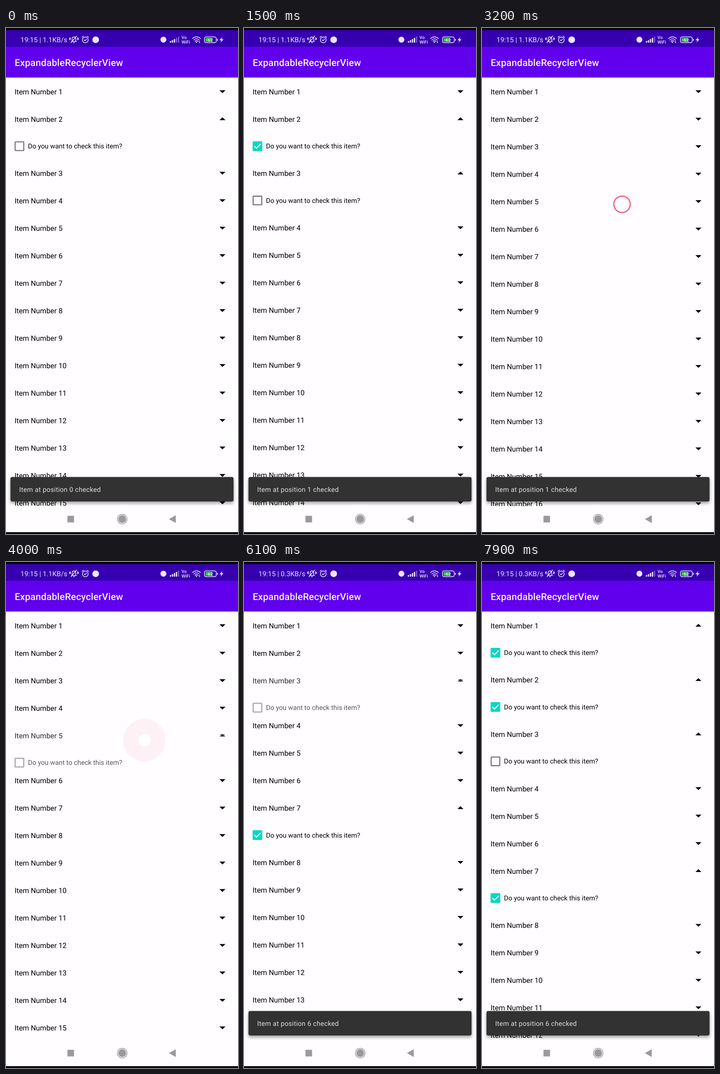
An HTML page for the animation above (8 s loop, 507 by 1105 pixels).

```html
<!DOCTYPE html>
<html lang="en">
<head>
<meta charset="utf-8">
<title>Expandable list</title>
<style>
  html, body { margin: 0; width: 100%; height: 100%; overflow: hidden; background: #fffdff; }
  svg { display: block; }
  text { font-family: Roboto, "Noto Sans", sans-serif; white-space: pre; text-rendering: geometricPrecision; }
  .item { font-size: 15.8px; }
  .ask { font-size: 14.62px; }
  .line { fill: none; stroke: #ece6ff; stroke-width: 1.5; stroke-linecap: round; stroke-linejoin: round; }
</style>
</head>
<body>
<svg id="stage" width="507" height="1105" viewBox="0 0 507 1105">
  <defs>
    <clipPath id="content"><rect y="108" width="507" height="936"/></clipPath>
    <filter id="shade" x="-5%" y="-30%" width="110%" height="180%">
      <feDropShadow dx="0" dy="4" stdDeviation="3.5" flood-color="#000" flood-opacity=".38"/>
    </filter>
  </defs>
  <rect width="507" height="1105" fill="#fffdff"/>
  <g clip-path="url(#content)">
    <g id="list"></g>
    <g id="snack">
      <rect x="9.700" y="980.400" width="487.600" height="53.600" rx="4" fill="#323133" filter="url(#shade)"/>
      <text id="message" x="28.700" y="1013" font-size="14.65" letter-spacing=".26" fill="#e1dfe1"></text>
    </g>
  </g>

  <rect y="41" width="507" height="67.200" fill="#6100ed"/>
  <rect y="4" width="507" height="37" fill="#3600b1"/>
  <rect width="507" height="4.500"/>
  <rect y="1101" width="507" height="4"/>
  <text x="18.900" y="83" font-size="20.9" font-weight="500" letter-spacing=".13" fill="#f5efff">ExpandableRecyclerView</text>

  <g id="status" fill="#ece6ff">
    <text id="speed" x="31.700" y="31" font-size="15.05"></text>
    <path class="line" d="M143 29.500h11M144.500 29v-5q0-4.500 4-4.500t4 4.500v5M147.500 32h2M142 32L154.500 17.500M140.500 21v5M138.800 22v3M156.500 21v5M158.200 22v3"/>
    <circle class="line" cx="173.300" cy="26" r="6.300"/>
    <path class="line" d="M166.200 20.500l3-2.700M180.400 20.500l-3-2.700M170.600 26l2 2l3.600-3.700"/>
    <circle cx="196" cy="25.700" r="7.300"/>
    <circle cx="344" cy="25.500" r="6.500"/>
    <g id="signal"></g>
    <text x="383.500" y="24" font-size="9.5" font-weight="500">Vo</text>
    <text x="383.500" y="34" font-size="9.5" font-weight="500">WiFi</text>
    <path class="line" d="M407.500 23q8.800-7.500 17.600 0M410.300 26q6-5 12 0M413 28.800q3.300-2.600 6.600 0"/>
    <path d="M413.700 30h5l-2.500 2.800zM421 30l1.700-2.200l1.700 2.200zM421 31l1.700 2.200l1.700-2.200z"/>
    <rect class="line" x="433.700" y="19.500" width="25.800" height="12.500" rx="3.500"/>
    <rect x="436" y="21.700" width="15" height="8.200" rx="1.500" fill="#39c64c"/>
    <text x="446.500" y="29.500" font-size="10" font-weight="500" text-anchor="middle">62</text>
    <rect x="461" y="23.500" width="1.800" height="4.500" rx=".9"/>
    <path d="M473 19.500l-6.500 7.200h4l-1.800 5.300l6.700-7.500h-4.200z"/>
  </g>

  <g fill="#9b999b">
    <rect x="134.300" y="1065.300" width="14.400" height="14.400"/>
    <circle cx="254" cy="1072.500" r="8.500"/>
    <circle cx="254" cy="1072.500" r="10.500" fill="none" stroke="#9b999b" stroke-width="1.400"/>
    <path d="M356 1072.500L371 1064V1081Z"/>
  </g>
  <g id="touch">
    <circle id="hole" fill="#fff"/>
    <circle id="halo" fill="none" stroke="#f0496c"/>
  </g>
</svg>
<script>
const LOOP = 8000, STEP = 100, ROW = 60, EXTRA = 58.6, COUNT = 17;
const GREY = '#757378', TEAL = '#05d8c5';

// time, row, opens
const toggles = [
  [-235, 1, 1], [1040, 2, 1], [2133, 2, 0], [2720, 1, 0], [3310, 4, 1], [3900, 4, 0],
  [4820, 6, 1], [5950, 2, 1], [6430, 1, 1], [6940, 0, 1]
];
// row: time it gets checked
const checks = { 0: -1000, 1: 430, 6: 5360 };
// down, up, x, y
const touches = [
  [310, 440, 238, 262], [900, 1025, 378.6, 304.5], [2010, 2115, 335, 308],
  [2600, 2705, 318, 182], [3190, 3295, 306, 385], [3780, 3885, 302.5, 389],
  [4650, 4800, 270, 524], [5240, 5400, 241, 561.8], [5810, 5930, 312, 264],
  [6300, 6410, 318, 198], [6780, 6915, 321.4, 135.2]
];
// shown from, until, position
const snacks = [[-1000, 455, 0], [540, 3560, 1], [5470, 9000, 6]];

const $ = id => document.getElementById(id);
const clamp = v => Math.max(0, Math.min(1, v));
const mix = (a, b, k) => a + (b - a) * k;
const smooth = k => (1 - Math.cos(Math.PI * clamp(k))) / 2;

function set(node, attrs) {
  for (const key in attrs) node.setAttribute(key, attrs[key]);
  return node;
}
function add(parent, tag, attrs, text) {
  const node = set(document.createElementNS('http://www.w3.org/2000/svg', tag), attrs);
  if (text) node.textContent = text;
  return parent.appendChild(node);
}

function makeRow(i) {
  const root = add($('list'), 'g', {});
  const face = arrow => {
    const g = add(root, 'g', {});
    add(g, 'text', { class: 'item', x: 18.7, y: 5.8 }, `Item Number ${i + 1}`);
    add(g, 'path', { d: arrow });
    return g;
  };
  const closed = face('M466.5-3H479.5L473 3.2Z');
  const open = face('M466.5 2.2H479.5L473-4Z');
  add(open, 'text', { class: 'ask', x: 48.1, y: 64.3 }, 'Do you want to check this item?');
  return {
    root, closed, open,
    ripple: add(open, 'circle', { cy: 59, r: 16 }),
    box: add(open, 'path', { 'fill-rule': 'evenodd' }),
    tick: add(open, 'path', {
      d: 'M22.8 59L27.3 63.5L36.3 54.3', fill: 'none', stroke: '#fff',
      'stroke-width': 2.3, pathLength: 1, 'stroke-dasharray': '1 2'
    })
  };
}

const rows = Array.from({ length: COUNT }, (_, i) => makeRow(i));
const bars = [3.5, 5.5, 8, 10.5, 13].map((h, i) =>
  add($('signal'), 'rect', { x: 358 + i * 4.4, y: 32 - h, width: 2.8, height: h, rx: .8 }));

function openness(i, t) {
  let p = 0;
  for (const [at, row, opens] of toggles) {
    if (row === i && t >= at) p = opens ? smooth((t - at) / 250) : 1 - smooth((t - at) / 250);
  }
  return p;
}

// The frame thickens inwards until the box is full, then the tick is drawn.
function drawCheck(row, age) {
  const on = age >= 0;
  const w = on ? Math.min(10.6, 2.3 + age * .065) : 2.3, hole = 21.2 - 2 * w;
  set(row.box, {
    d: 'M20.8 48.5h17.2q2 0 2 2v17.2q0 2-2 2h-17.2q-2 0-2-2v-17.2q0-2 2-2z' +
      `M${18.8 + w} ${48.5 + w}h${hole}v${hole}h${-hole}z`,
    fill: on ? TEAL : GREY
  });
  const drawn = clamp((age - 140) / 130);
  set(row.tick, { 'stroke-dashoffset': 1 - drawn, opacity: drawn ? 1 : 0 });
  set(row.ripple, {
    cx: mix(42, 29.4, clamp(age / 190)),
    opacity: on ? .13 * clamp((360 - age) / 180) : 0
  });
}

function drawRows(t) {
  let y = 139;
  rows.forEach((row, i) => {
    const p = openness(i, t);
    set(row.root, { transform: `translate(0 ${y.toFixed(2)})` });
    set(row.closed, { opacity: 1 - p });
    set(row.open, { opacity: p });
    drawCheck(row, i in checks ? t - checks[i] : -1);
    y += ROW + EXTRA * p;
  });
}

function drawSnack(t) {
  const now = snacks.find(([from, until]) => t >= from && t < until + 75);
  if (!now) return set($('snack'), { opacity: 0 });
  const [from, until, position] = now;
  const k = clamp((t - from) / 150);
  const scale = mix(.8, 1, 1 - (1 - k) ** 2);
  set($('snack'), {
    opacity: k * clamp(1 - (t - until) / 75),
    transform: `translate(253.5 1007.5) scale(${scale}) translate(-253.5 -1007.5)`
  });
  $('message').textContent = `Item at position ${position} checked`;
}

// A thin ring swells into a wide one, then fades.
function drawTouch(t) {
  const now = touches.find(([down, up]) => t >= down && t < up + 130);
  if (!now) return set($('touch'), { opacity: 0 });
  const [down, up, x, y] = now;
  const grow = smooth((t - down) / 110), fade = clamp((t - up) / 130);
  const inner = mix(16.6, 13.3, grow), outer = mix(18.7, 49, grow) - 3.2 * fade;
  set($('touch'), { opacity: 1, transform: `translate(${x} ${y})` });
  set($('hole'), { r: inner, opacity: .65 * grow });
  set($('halo'), {
    r: (inner + outer) / 2, 'stroke-width': outer - inner,
    opacity: mix(.85, .55, grow) * (1 - fade)
  });
}

function drawStatus(t) {
  $('speed').textContent = `19:15 | ${t < 5700 ? '1.1' : '0.3'}KB/s`;
  bars.forEach((bar, i) => set(bar, { opacity: i < (t < 1400 ? 3 : 4) ? 1 : .4 }));
}

function render(t) {
  drawRows(t);
  drawSnack(t);
  drawTouch(t);
  drawStatus(t);
}

function frame() {
  render(Math.floor((performance.now() + 15) / STEP) * STEP % LOOP);
  requestAnimationFrame(frame);
}
frame();
</script>
</body>
</html>
```
